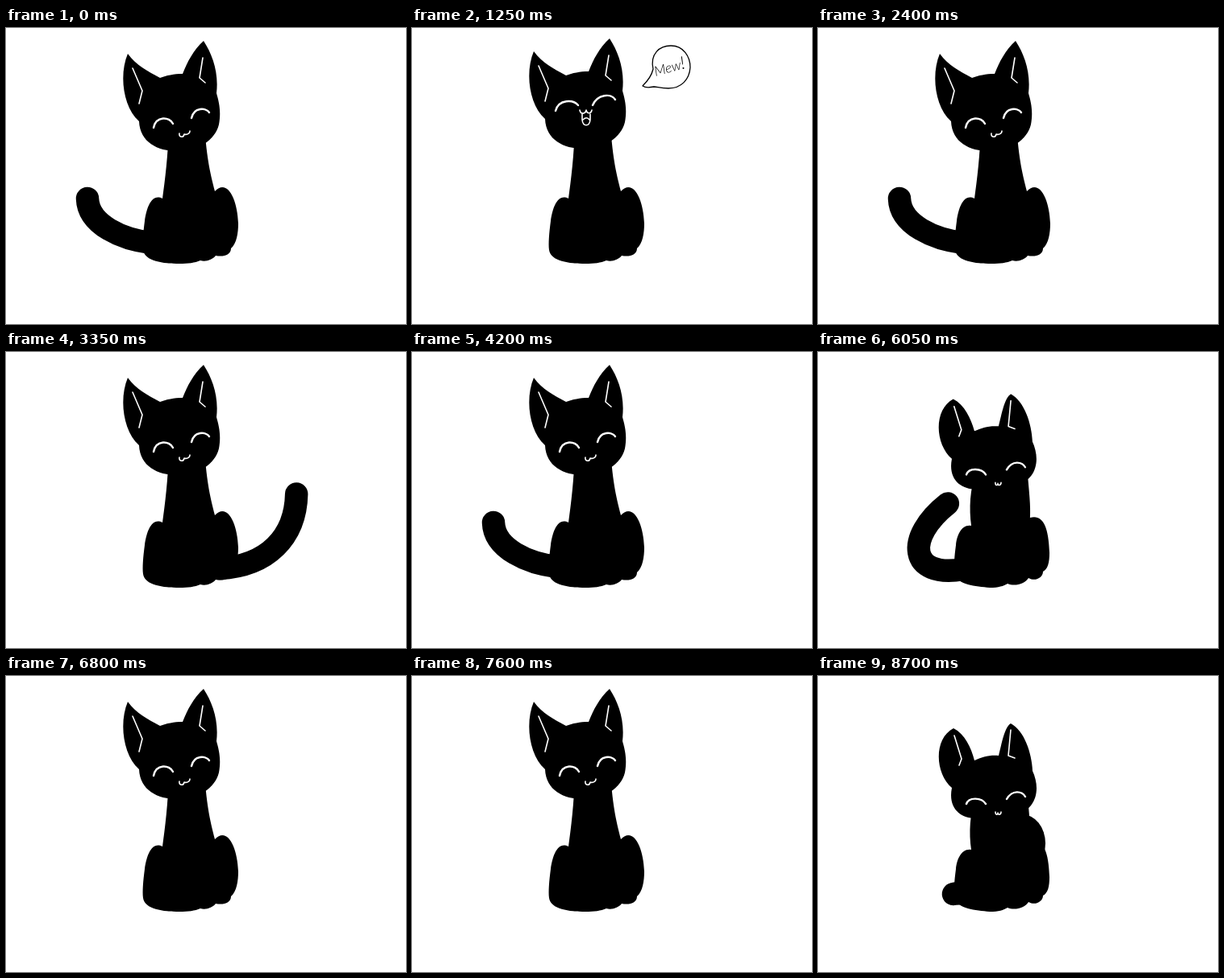
An HTML page without scripts that plays this animation: 496 by 368 pixels, repeating every 8.75 s.

```html
<!DOCTYPE html>
<html lang="en">
<head>
<meta charset="utf-8">
<title>Black cat</title>
<style>
html, body { margin: 0; width: 100%; height: 100%; overflow: hidden; background: #fff; }
svg { display: block; width: 496px; height: 368px; }

.line { fill: none; stroke: #fff; stroke-linecap: round; stroke-linejoin: round; }
.thin { stroke-width: 1.6; }
.bold { stroke-width: 2.4; }

/* Each part has a sitting and a ducking shape; all share one timeline. */
.pose { animation: bounce 8.75s linear infinite; }
.face { --crouch: translateY(6px); --stretch: translateY(-16px); --rebound: translateY(-8px); --call: translateY(-3px); }
.shoulder { --crouch: translateX(26px); }
.tail { fill: none; stroke: #000; stroke-width: 28.5; stroke-linecap: round; animation: swish 8.75s linear infinite; }
.calm, .loud { animation: speak 8.75s step-end infinite; }
.calm { --silent: 1; --speaking: 0; }
.loud { --silent: 0; --speaking: 1; }

.body {
  --sit: path("M202 120C201 160 197 190 194 212C180 205 174 225 172 240C170 255 169 268 170 276C172 290 195 293 215 293C226 293 234 292 241 289C248 291 256 288 260 283C270 285 279 282 279 274C286 268 288 255 288 243C287 212 274 187 259 203C254 183 249 165 246 120Z");
  --duck: path("M196 150C188 170 187 195 190 216C178 214 172 228 171 240C169 255 168 268 170 276C173 290 195 291 213 293C224 293 230 291 235 288C244 292 257 288 261 281C270 286 279 280 279 273C285 270 287 262 287 250C286 215 278 202 263 206C264 190 262 175 260 150Z");
}
.head {
  --sit: path("M151 32C140 58 145 98 165 116C166 142 188 153 212 153C238 153 259 140 264 120C267 103 264 92 261 81C264 55 256 33 245 16C232 28 225 42 219 57C208 57 199 59 191 62C175 53 162 47 151 32Z");
  --duck: path("M168 59C143 72 145 115 166 133C161 158 176 171 196 171C215 173 248 174 264 155C274 142 272 125 266 112C265 90 256 62 239 53C231 58 228 78 224 93C212 92 203 95 194 99C190 83 182 66 168 59Z");
}
.ears {
  --sit: path("M157 50L169 78L165 94M244 37L240 62L247 68");
  --duck: path("M169 68L178 97L175 105M239 61L236 93L244 96");
}
.eyes {
  --sit: path("M183 124C186 109 203 110 207 119M230 112C233 98 248 99 252 105");
  --duck: path("M184 153C187 144 203 145 208 153M234 147C241 135 253 137 257 144");
}
.mouth {
  --sit: path("M215 131C214 136 220 137 221 132C223 133 228 132 228 128");
  --duck: path("M220 163C220 167 223 167 223 164C223 167 227 167 227 163");
}

@keyframes bounce {
  0%, 3%, 9.5%, 20%, 26.8%, 48.7%, 55.2%, 65.7%, 72%, 94.4% { d: var(--sit, none); transform: none; }
  8%, 22%, 53.7%, 67.7%, 99.4%, 100% { d: var(--duck, none); transform: var(--crouch, none); }
  23.4%, 69.1% { d: var(--duck, none); transform: none; }
  10.5%, 56.2% { d: var(--sit, none); transform: var(--stretch, none); }
  12.5%, 18.3%, 58.2%, 64% { d: var(--sit, none); transform: var(--call, none); }
  19.2%, 64.9% { d: var(--sit, none); transform: var(--rebound, none); }
}
@keyframes swish {
  /* out left, curled, tucked left, tucked right, raised right, out right */
  0%, 2.5%, 26.5%, 28%, 46.3%, 48.3%, 72%, 73.7%, 92%, 94% { d: path("M180 267C145 263 102 245 101 212"); }
  5.5%, 23.4%, 30.3%, 44%, 51.2%, 69.1%, 75.5%, 89.5%, 97% { d: path("M180 270C112 282 108 230 162 188"); }
  8%, 21%, 32%, 42.3%, 53.7%, 66.7%, 77%, 88%, 99.4%, 100% { d: path("M185 270C180 270 172 270 168 271"); }
  8.7%, 14.2%, 18.3%, 33.5%, 41%, 54.4%, 59.9%, 64%, 78.8%, 86.7% { d: path("M240 266C245 266 250 266 255 266"); }
  10.3%, 37.2%, 56%, 82.5% { d: path("M265 269C330 266 342 200 348 132"); }
  11.6%, 39%, 57.3%, 84.3% { d: path("M265 269C320 266 370 250 368 205"); }
}
@keyframes speak {
  0%, 18.28%, 64% { opacity: var(--silent); }
  12.5%, 58.2% { opacity: var(--speaking); }
}
</style>
</head>
<body>
<svg viewBox="0 0 496 368">
  <path class="tail"/>
  <path class="pose body"/>
  <ellipse class="pose shoulder" cx="227" cy="208" rx="29" ry="36"/>
  <path class="pose face head"/>
  <path class="pose face ears line thin"/>
  <g class="calm">
    <path class="pose face eyes line bold"/>
    <path class="pose face mouth line thin"/>
  </g>
  <g class="loud">
    <path class="line bold" d="M178 103C182 88 200 89 206 96M224 96C230 82 247 81 252 89"/>
    <path class="line thin" d="M208 102C209 108 215 107 216 102C217 107 222 107 223 102M211 107V114C212 123 220 123 221 114V107M212 114C215 111 218 111 220 114"/>
    <path fill="none" stroke="#000" stroke-width="1.3" stroke-linejoin="round" d="M299 51C295 32 307 22 321 22C337 22 345 36 345 49C344 64 334 75 318 75C308 75 304 73 300 73C295 74 290 75 286 72C292 66 297 60 299 51Z"/>
    <text transform="translate(302 60) rotate(-15)" font-family="Lato, sans-serif" font-style="italic" font-weight="300" font-size="17">Mew<tspan font-size="22">!</tspan></text>
  </g>
</svg>
</body>
</html>
```
